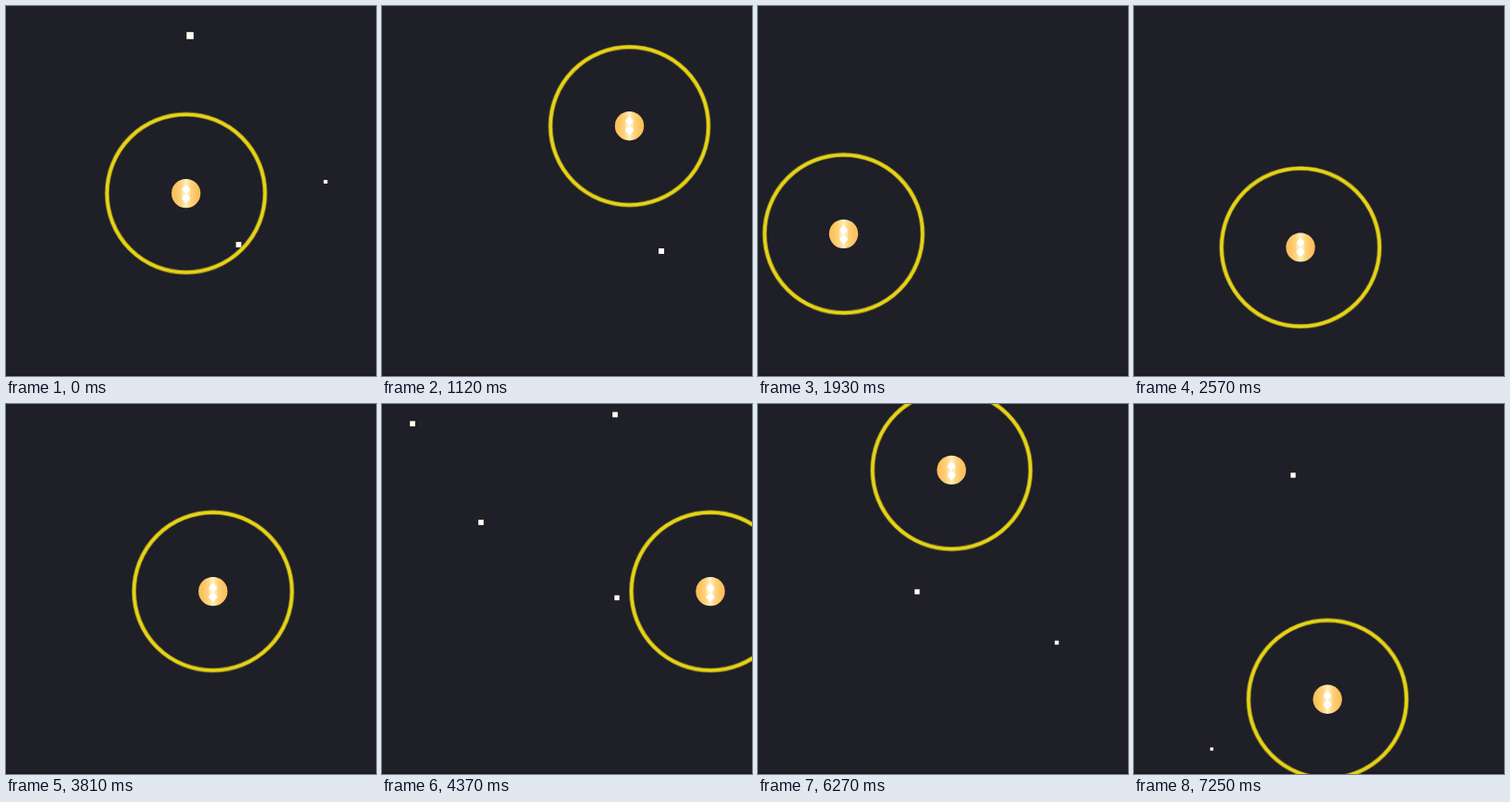
Animation, 400 px wide and 400 px high, one loop 7300 ms. Source, as an HTML page with a canvas:

```html
<!DOCTYPE html>
<html lang="en">
<head>
<meta charset="utf-8">
<title>Glowing orb</title>
<style>
  html, body { margin: 0; width: 100%; height: 100%; overflow: hidden; background: #1f1f28; }
  canvas { display: block; width: 400px; height: 400px; }
</style>
</head>
<body>
<canvas id="stage" width="400" height="400"></canvas>
<script>
const ctx = document.getElementById('stage').getContext('2d');
const LOOP = 7300;
const CELL = 14.58;
const HOME = { x: 194.6, y: 202.6 };
const RISE = 6;        // spark climb per step
const LIFE = 11;       // steps a spark lives before and after its key point

// Busy stretches, with pauses between them: start, end, steps
const RUNS = [[50, 280, 6], [790, 2570, 38], [3450, 5110, 36], [5680, 7250, 35]];

// Legs of the orb's walk over the grid: columns, rows, steps
const LEGS = [
  [5, 0, 6], [0, -5, 8], [-12, 0, 8], [0, 8, 8], [6, 0, 7], [0, 1, 7],
  [0, -4, 4], [12, 0, 16], [0, 5, 6], [-10, 0, 10], [0, -14, 14], [0, 17, 17]
];

// Key points of the sparks: x, y, step, size
const SPARKS = [
  [199, 32, 0, 7.6], [251.5, 258, 0, 5.8], [345.5, 190, 0, 4],
  [302, 283, 11, 6],
  [33, 21.3, 64, 5.7], [252, 11.5, 64, 5.7], [107, 128, 64, 5.7], [254, 209.5, 64, 5.4],
  [172, 140, 104.5, 5.4], [323, 258, 94, 4.4], [84, 373, 115, 3.4]
];

function stepAt(t) {
  let n = 0;
  for (const [start, end, count] of RUNS) {
    if (t < start) break;
    const gap = (end - start) / (count - 1);
    n += Math.min(count, 1 + Math.floor((t - start) / gap + .25));
  }
  return n;
}

function orbAt(n) {
  let col = 0, row = 0;
  for (const [dx, dy, count] of LEGS) {
    const k = Math.min(1, n / count);
    col += Math.round(dx * k);
    row += Math.round(dy * k);
    n -= count;
    if (n <= 0) break;
  }
  return { x: HOME.x + CELL * col, y: HOME.y + CELL * row };
}

function diamond(y, w, h) {
  ctx.beginPath();
  ctx.moveTo(0, y - h);
  ctx.lineTo(w, y);
  ctx.lineTo(0, y + h);
  ctx.lineTo(-w, y);
  ctx.fill();
}

function circle(r) {
  ctx.beginPath();
  ctx.arc(0, 0, r, 0, 2 * Math.PI);
}

function ring(r, width, color) {
  ctx.strokeStyle = color;
  ctx.lineWidth = width;
  circle(r);
  ctx.stroke();
}

const gold = ctx.createLinearGradient(-16, 0, 16, 0);
['#fdbb54', '#fdc563', '#fdd47f', '#fff0c0', '#fdd47f', '#fdc563', '#fdbb54']
  .forEach((color, i, all) => gold.addColorStop(i / (all.length - 1), color));

function drawOrb({ x, y }, n) {
  ctx.save();
  ctx.translate(x, y);
  ring(85.4, 5.2, 'rgba(226, 209, 26, .5)');
  ring(85.4, 3.4, '#e6d317');

  ctx.fillStyle = gold;
  circle(15.7);
  ctx.fill();
  const sway = Math.sin(n * 1.7);
  ctx.fillStyle = 'rgba(255, 244, 205, .6)';
  ctx.beginPath();
  ctx.ellipse(0, 0, 4.5, 10, 0, 0, 2 * Math.PI);
  ctx.fill();
  ctx.fillStyle = '#ffffff';
  diamond(-4.5 + sway, 4.6, 5);
  diamond(5.5 + sway * .7, 4.8, 5.5);
  ctx.restore();
}

function drawSparks(n) {
  ctx.fillStyle = '#fffcee';
  for (const [x, y, key, size] of SPARKS) {
    const age = n - key;
    if (Math.abs(age) < LIFE)
      ctx.fillRect(x - size / 2, y - RISE * age - size / 2, size, size);
  }
}

function draw(time) {
  const n = stepAt(time % LOOP);
  ctx.fillStyle = '#1f1f28';
  ctx.fillRect(0, 0, 400, 400);
  ctx.fillStyle = '#1c1a23';
  ctx.fillRect(0, 398, 400, 2);
  drawSparks(n);
  drawOrb(orbAt(n), n);
}

const start = performance.now();
function loop() {
  draw(performance.now() - start);
  requestAnimationFrame(loop);
}
loop();
</script>
</body>
</html>
```
